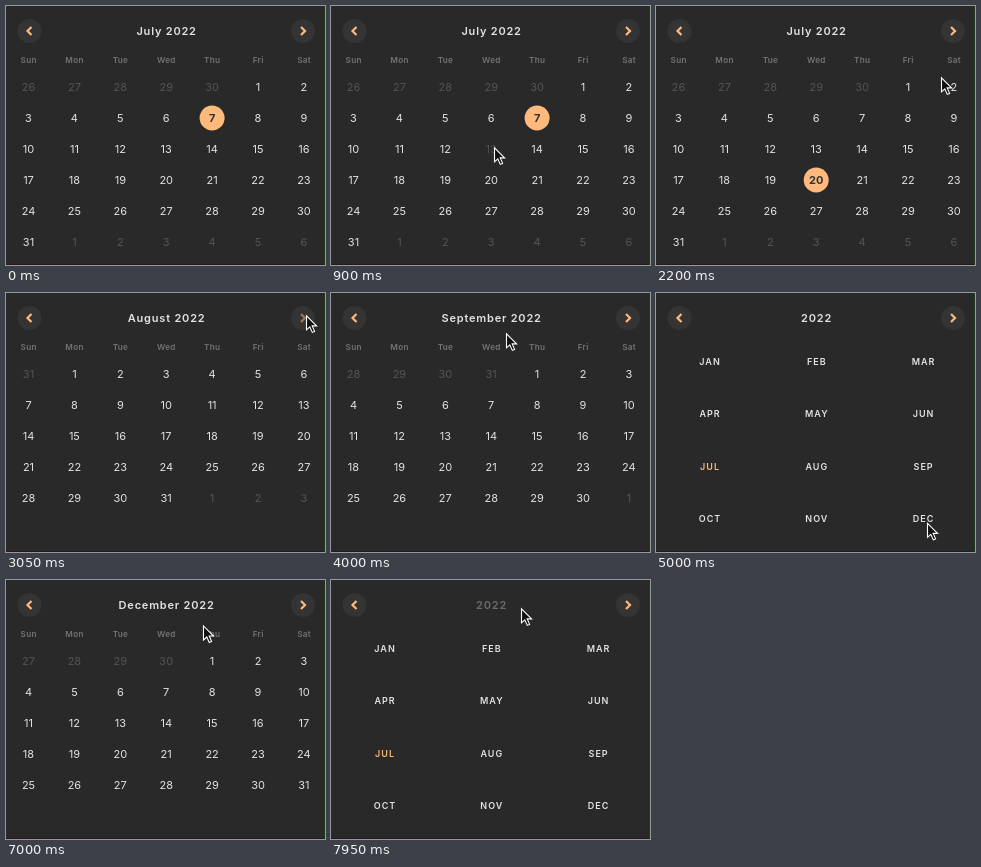
Write an HTML page with a canvas that moves like this. It is 319 px wide and 259 px high and loops after 8 s.

```html
<!DOCTYPE html>
<html lang="en">
<head>
<meta charset="utf-8">
<title>Date picker</title>
<style>
  html, body { margin: 0; width: 100%; height: 100%; overflow: hidden; background: #292929; }
  canvas { display: block; }
</style>
</head>
<body>
<canvas id="stage" width="319" height="259"></canvas>
<script>
const ctx = document.getElementById('stage').getContext('2d');
const LOOP = 8000, STEP = 50, YEAR = 2022;
const ACCENT = '#feb97c', TEXT = '#e2e2e2', MUTED = '#545454', LABEL = '#737373';
const MONTHS = ['January', 'February', 'March', 'April', 'May', 'June', 'July',
  'August', 'September', 'October', 'November', 'December'];
const WEEKDAYS = ['Sun', 'Mon', 'Tue', 'Wed', 'Thu', 'Fri', 'Sat'];

// Pointer path: time, x, y
const PATH = [
  [50, 291, 40], [550, 163, 141], [1150, 163, 141], [1400, 163, 179], [1500, 162, 173],
  [1950, 162, 173], [2200, 285, 71], [2600, 300, 22], [3750, 300, 22], [4000, 175, 40],
  [4350, 166, 24], [4600, 166, 24], [5000, 271, 229.5], [5150, 271, 230], [5300, 271, 230],
  [5600, 270, 225], [6550, 270, 225], [7100, 190, 28], [LOOP, 190, 28]
];

// Presses: control, time down, time up
const PRESSES = [
  ['day13', 900, 1100], ['day20', 1750, 1950], ['next', 2750, 2950], ['next', 3450, 3750],
  ['title', 4500, 4600], ['DEC', 5550, 6050], ['title', 7700, 7900]
];

// Pressed controls drop to 20% at once, then fade back in
function opacity(control, t) {
  let value = 1;
  for (const [name, down, up] of PRESSES) {
    if (name === control && t >= down) value = Math.min(1, 0.2 + 0.8 * Math.max(0, t - up) / 250);
  }
  return value;
}

function label(text, x, baseline, size, weight, color, spacing = 0) {
  ctx.font = `${weight} ${size}px Inter, sans-serif`;
  ctx.letterSpacing = spacing + 'px';
  ctx.fillStyle = color;
  ctx.fillText(text, x + spacing / 2, baseline);
}

function disc(x, y, r, color) {
  ctx.fillStyle = color;
  ctx.beginPath();
  ctx.arc(x, y, r, 0, 2 * Math.PI);
  ctx.fill();
}

function arrowButton(x, dir, alpha) {
  disc(x, 25, 12, '#343434');
  ctx.globalAlpha = alpha;
  ctx.strokeStyle = ACCENT;
  ctx.lineWidth = 2.2;
  ctx.beginPath();
  ctx.moveTo(x - 2 * dir, 21);
  ctx.lineTo(x + 2 * dir, 25);
  ctx.lineTo(x - 2 * dir, 29);
  ctx.stroke();
  ctx.globalAlpha = 1;
}

function drawDays(t, month) {
  const colX = i => 22.5 + 45.9 * i;
  const selected = month !== 6 ? 0 : t < 1100 ? 7 : t < 1950 ? 13 : 20;
  const offset = new Date(YEAR, month, 1).getDay();
  const days = new Date(YEAR, month + 1, 0).getDate();
  WEEKDAYS.forEach((name, i) => label(name, colX(i), 57, 8.2, 600, LABEL, 0.3));
  for (let i = 0; i < Math.ceil((offset + days) / 7) * 7; i++) {
    const date = new Date(YEAR, month, 1 - offset + i);
    const day = date.getDate(), inMonth = date.getMonth() === month;
    const x = colX(i % 7), y = 81 + 31 * Math.floor(i / 7);
    const active = inMonth && day === selected;
    if (inMonth && month === 6) ctx.globalAlpha = opacity('day' + day, t);
    if (active) disc(x, y, 12.5, ACCENT);
    label(day, x, y + 4, 11, active ? 700 : 400, active ? '#333' : inMonth ? TEXT : MUTED);
    ctx.globalAlpha = 1;
  }
}

function drawMonths(t) {
  MONTHS.forEach((name, i) => {
    const short = name.slice(0, 3).toUpperCase();
    ctx.globalAlpha = opacity(short, t);
    label(short, 53.5 + 106.8 * (i % 3), 72 + 52.3 * Math.floor(i / 3), 9, 600,
      i === 6 ? ACCENT : TEXT, 1);
    ctx.globalAlpha = 1;
  });
}

function drawPointer(t) {
  const i = PATH.findIndex(p => p[0] > t);
  if (i < 1) return;
  const [t0, x0, y0] = PATH[i - 1], [t1, x1, y1] = PATH[i];
  const p = (t - t0) / (t1 - t0), ease = p * p * (3 - 2 * p);
  ctx.save();
  ctx.translate(x0 + (x1 - x0) * ease, y0 + (y1 - y0) * ease);
  ctx.fillStyle = '#111';
  ctx.strokeStyle = '#fff';
  ctx.lineWidth = 1.1;
  const outline = new Path2D('M.5 .8V14.8L3.8 11.8L6.3 17.4L8.6 16.4L6.2 10.9H10.6Z');
  ctx.fill(outline);
  ctx.stroke(outline);
  ctx.restore();
}

function draw(now) {
  const t = Math.floor(now % LOOP / STEP) * STEP;
  const yearView = t >= 4600 && t < 6050 || t >= 7900;
  const month = t < 2950 ? 6 : t < 3750 ? 7 : t < 4600 ? 8 : 11;
  ctx.fillStyle = '#292929';
  ctx.fillRect(0, 0, 319, 259);
  ctx.fillStyle = '#1b3a1b';
  ctx.fillRect(318, 0, 1, 259);
  ctx.fillStyle = '#2a191b';
  ctx.fillRect(0, 258, 318, 1);
  ctx.textAlign = 'center';
  arrowButton(23.5, -1, 1);
  arrowButton(297, 1, opacity('next', t));
  ctx.globalAlpha = opacity('title', t);
  label(yearView ? YEAR : `${MONTHS[month]} ${YEAR}`, 160.2, 29, 11, 600, TEXT, 0.8);
  ctx.globalAlpha = 1;
  if (yearView) drawMonths(t);
  else drawDays(t, month);
  drawPointer(t);
}

let start;
function tick(now) {
  start ??= now;
  draw(now - start);
  requestAnimationFrame(tick);
}
requestAnimationFrame(tick);
</script>
</body>
</html>
```
